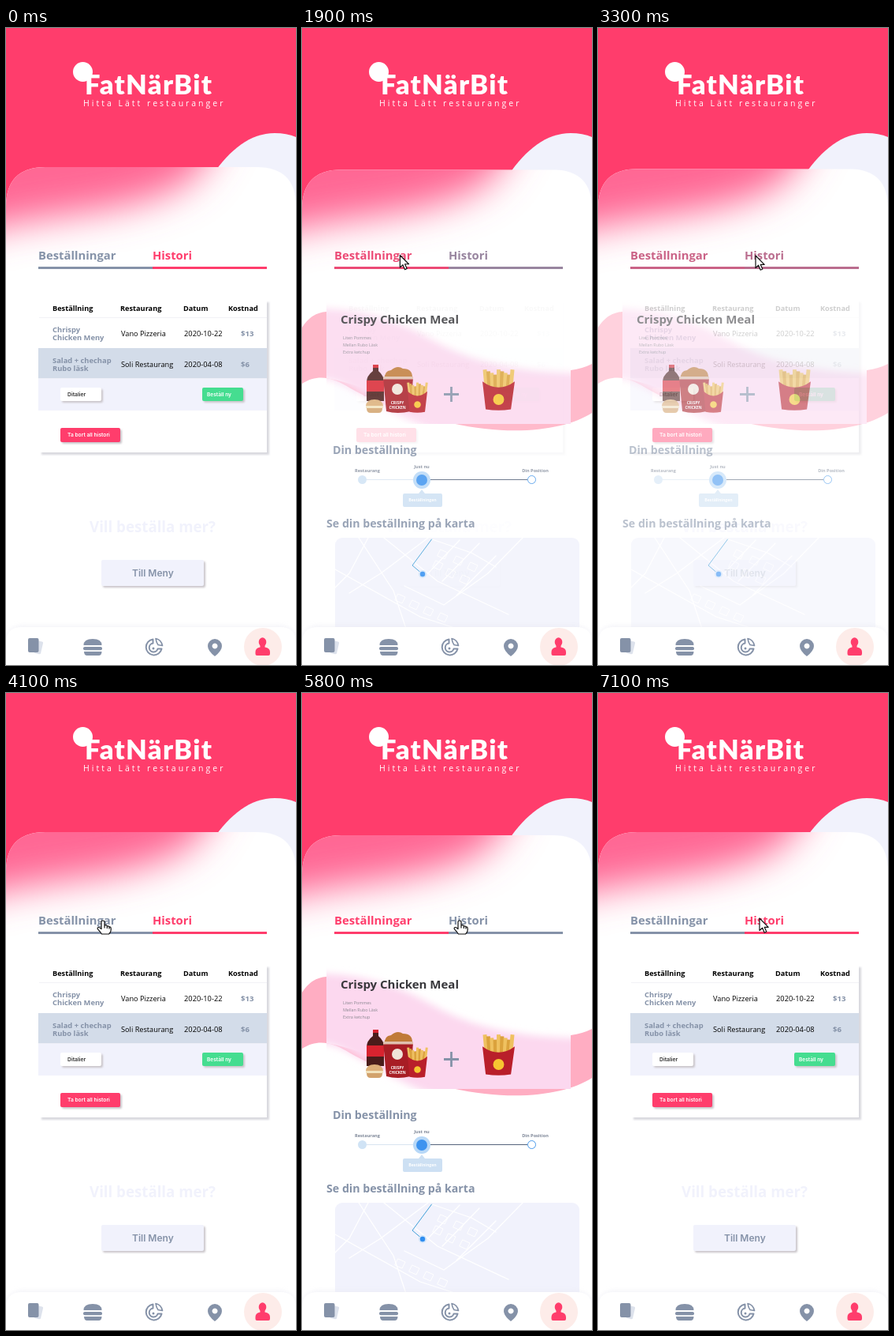
Animation of 368x806 px, one loop 7200 ms. Source, as an HTML page:

```html
<!DOCTYPE html>
<html lang="sv">
<head>
<meta charset="utf-8">
<title>Restaurang</title>
<style>
  html, body { margin: 0; width: 100%; height: 100%; overflow: hidden; background: #fff; }
  svg { display: block; width: 368px; height: 806px; font-family: "Open Sans", "Noto Sans", sans-serif; }
  .b { font-weight: 700; }
  .ui { font-family: Inter, Roboto, sans-serif; font-weight: 600; }
  .gray { fill: #8592a8; }
  .pink { fill: #ff3d6c; }
  .white { fill: #fff; }
  .lav { fill: #f1f2fc; }
  .line { fill: none; stroke-linecap: round; stroke-linejoin: round; }
</style>
</head>
<body>
<svg viewBox="0 0 368 806">
  <defs>
    <filter id="glow" x="-30%" y="-40%" width="160%" height="180%"><feGaussianBlur stdDeviation="24"/></filter>
    <filter id="soft" x="-10%" y="-20%" width="120%" height="140%"><feGaussianBlur stdDeviation="5"/></filter>
    <filter id="shade" x="-10%" y="-30%" width="120%" height="160%"><feGaussianBlur stdDeviation="1"/></filter>
    <filter id="navShade" x="-10%" y="-30%" width="120%" height="160%"><feGaussianBlur stdDeviation="3"/></filter>
    <clipPath id="panelClip"><path d="M0 226Q0 176 50 176H318Q368 176 368 226V806H0Z"/></clipPath>
    <clipPath id="cardClip"><path d="M31 340H341V501H31Z"/></clipPath>
    <clipPath id="mapClip"><rect x="42" y="645" width="310" height="170" rx="9"/></clipPath>
  </defs>

  <rect width="368" height="240" class="pink"/>
  <path class="lav" d="M262 186C284 154 310 133 341 133Q356 133 368 138V250H262Z"/>
  <g class="white">
    <circle cx="97.500" cy="55.500" r="12.500"/>
    <text x="100" y="84" font-family="Lato, sans-serif" font-weight="900" font-size="34.500" letter-spacing="1.300">FatNärBit</text>
    <text x="98" y="99" font-size="10.500" letter-spacing="3.020">Hitta Lätt restauranger</text>
  </g>

  <g id="panel">
    <g clip-path="url(#panelClip)">
      <rect y="170" width="368" height="640" fill="#fff"/>
      <path d="M-100 80H290Q262 180 222 200C185 220 130 230 75 237S-30 256 -100 272Z" fill="#ff6794" filter="url(#glow)"/>
    </g>
  </g>

  <g id="history">
    <path d="M45 347H334V540H45Z" fill="#d9d9df" filter="url(#shade)"/>
    <path d="M42 344H331V537H42Z" class="white"/>
    <path d="M42 366.500H331" stroke="#f2f2f6"/>
    <path d="M41 405H331V443.500H41Z" fill="#d3dce9"/>
    <path d="M41 443.500H331V484H41Z" class="lav"/>
    <g id="rows"></g>
    <g id="buttons"></g>
    <text x="106" y="637.500" class="b lav" font-size="18.700">Vill beställa mer?</text>
  </g>

  <g id="orders">
    <path d="M0 379Q12 360 31 359C100 352 150 368 200 392C250 416 300 440 341 433Q356 431 368 425V487C335 508 270 518 190 500C150 495 100 478 60 455C40 442 20 437 0 450Z" fill="#ffadc2"/>
    <path d="M31 340H341V501H185C130 490 100 455 31 443Z" class="white"/>
    <g clip-path="url(#cardClip)">
      <path d="M10 355C80 354 125 372 168 396C212 421 270 436 360 437V520H200C140 502 100 478 60 455C45 447 30 442 10 444Z" fill="#fcd8ef" filter="url(#soft)"/>
    </g>
    <text x="49" y="374" class="b" font-size="15" fill="#37373b">Crispy Chicken Meal</text>
    <g font-size="5.400" fill="#8a8790">
      <text x="52" y="394">Liten Pommes</text>
      <text x="52" y="403">Mellan Rubo Läsk</text>
      <text x="52" y="412">Extra ketchup</text>
    </g>

    <g id="food">
      <path d="M90 427h7v7q7 6 7 14v24H82v-24q0-8 8-14Z" fill="#4a1c1a"/>
      <path d="M90 426h7v4h-7ZM82 446h22v14H82Z" fill="#d8232f"/>
      <path d="M105 444q-1-10 8-11q8-7 15-2q13 0 12 13Z" fill="#c07a38"/>
      <path d="M103 442H141L138 485Q121 489 107 485Z" fill="#a81d25"/>
      <path d="M103 441H141V444.500H103Z" fill="#e0c0ae"/>
      <circle cx="121" cy="457" r="7" fill="#f0e4d8"/>
      <g class="b white" font-size="4.800" text-anchor="middle">
        <text x="121" y="476">CRISPY</text><text x="121" y="482">CHICKEN</text>
      </g>
      <path d="M81 478q1-8 11-8t11 8Z" fill="#dcae78"/>
      <path d="M81 478h22v3H81Z" fill="#f2e3bd"/>
      <path d="M82 481h20q0 6-5 6H87q-5 0-5-6Z" fill="#d2a26c"/>
    </g>
    <path d="M180 463.500H199M189.500 454V473" stroke="#8592a8" stroke-width="2.800"/>

    <text x="39" y="539" class="b gray" font-size="14.200">Din beställning</text>
    <path d="M76 571.500H152" stroke="#d9e4f1"/>
    <path d="M152 571.500H286" stroke="#56657c"/>
    <circle cx="76.500" cy="571.500" r="5.500" fill="#d0e3f5"/>
    <circle cx="152" cy="572" r="11" fill="#b8d8f7"/>
    <circle cx="152" cy="572" r="7" fill="#3d93ef"/>
    <circle cx="291.500" cy="571.500" r="5" fill="#fff" stroke="#4798ea"/>
    <path d="M148 589L152 584L156 589H176Q178 589 178 591V604Q178 606 176 606H130Q128 606 128 604V591Q128 589 130 589Z" fill="#cde0f3"/>
    <g class="b" font-size="5.600" fill="#7d8697" text-anchor="middle">
      <text x="83" y="562">Restaurang</text>
      <text x="152" y="557">Just nu</text>
      <text x="296" y="562">Din Position</text>
      <text x="153" y="598.500" class="white" font-size="5.200">Beställningen</text>
    </g>

    <text x="31" y="632" class="b gray" font-size="14.200">Se din beställning på karta</text>
    <g clip-path="url(#mapClip)">
      <rect x="42" y="645" width="310" height="170" class="lav"/>
      <g id="streets" class="line" stroke="#fff" stroke-width="1.300"></g>
    </g>
    <path d="M164.500 647L140 680L153 691" class="line" stroke="#3e9fd8"/>
    <circle cx="153" cy="691" r="5" fill="#cfe4fa"/>
    <circle cx="153" cy="691" r="3.200" fill="#2f8df0"/>
  </g>

  <g class="b" font-size="14.800">
    <text x="41" y="293" class="tab">Beställningar</text>
    <text x="186" y="293" class="tab">Histori</text>
    <rect x="41" y="302" width="145" height="3" class="tab"/>
    <rect x="186" y="302" width="145" height="3" class="tab"/>
  </g>

  <g id="nav">
    <rect x="0" y="757" width="368" height="70" rx="20" fill="#e9e9f2" opacity=".7" filter="url(#navShade)"/>
    <path class="white" d="M0 778Q0 758 20 758H348Q368 758 368 778V806H0Z"/>
    <circle cx="326" cy="783" r="24" fill="#fdece9"/>
    <ellipse class="pink" cx="325.500" cy="777" rx="4.800" ry="5.800"/>
    <path class="pink" d="M322.500 780h6v3.500q6.500 1 6.500 6v2.500q0 2-2 2H318.500q-2 0-2-2v-2.500q0-5 6-6Z"/>
    <g class="gray">
      <path d="M39 775l7 1.500q1.500.5 1 2l-3 13q-.5 1-2 .8l-6-1.300Z" fill="#dde2ec"/>
      <rect x="28" y="772" width="13.500" height="18" rx="2"/>
      <path d="M98.500 781q0-8 11.500-8t11.500 8Z"/>
      <rect x="98" y="783" width="24" height="4.200" rx="2"/>
      <path d="M99 789H121.500q0 5-4 5H103q-4 0-4-5Z"/>
      <path fill-rule="evenodd" d="M265 773a9 9 0 0 1 9 9q0 6-9 13q-9-7-9-13a9 9 0 0 1 9-9ZM265 778.500a3.500 3.500 0 1 0 .1 0Z"/>
      <circle cx="187" cy="785" r="1.500"/>
    </g>
    <g class="line" stroke="#8592a8" stroke-width="2">
      <path d="M186.500 773.500A10 10 0 1 0 197.500 785.500H192.500A5.500 5.500 0 1 1 186.500 778.500Z"/>
      <path d="M190 772.500Q197 774 198.500 781.500L193 780.500Q190.500 777 190 772.500Z" stroke-width="1.700"/>
    </g>
  </g>

  <g id="cursor" fill="#fff" stroke="#111" stroke-width="1.200" stroke-linejoin="round">
    <path id="arrow" d="M0 0V15.500L3.600 12.200L6.200 18.200L8.800 17L6.200 11.300H11.200Z"/>
    <path id="hand" d="M-2 1.500Q-2 0 0 0T2 1.500V6Q4.500 5 5.300 7Q7.300 6.300 8 8Q10.200 7.500 10.200 10V12Q10.200 15 7.500 17H-1.500Q-3 14.500-6.500 10.800Q-7.500 9-5.800 8.500Q-4 8.300-2 10.500ZM2 6V9.500M5.300 7V10M8 8V10.500"/>
  </g>
</svg>
<script>
const LOOP = 7200;
const SWITCH_MS = 350;
const CLICKS = [[1740, 1], [3240, 0], [4550, 1], [6440, 0]];
// time, x, y of the pointer tip
const PATH = [
  [400, 372, 560], [1100, 140, 316], [1400, 126, 288], [2350, 123, 287],
  [2900, 200, 288], [3850, 200, 288], [4100, 123, 288], [4300, 105, 286],
  [5350, 105, 286], [5800, 200, 288], [6100, 205, 285]
];
const $ = id => document.getElementById(id);
const tabs = document.querySelectorAll('.tab');

const text = (x, y, s, cls, size) => `<text x="${x}" y="${y}" class="${cls}" font-size="${size}">${s}</text>`;

$('rows').innerHTML =
  [[59, 'Beställning'], [145, 'Restaurang'], [225, 'Datum'], [282, 'Kostnad']]
    .map(([x, s]) => text(x, 358, s, 'b', 9.2)).join('') +
  [
    [390, 'Chrispy', 'Chicken Meny', 'Vano Pizzeria', '2020-10-22', '$13'],
    [429, 'Salad + chechap', 'Rubo läsk', 'Soli Restaurang', '2020-04-08', '$6']
  ].map(([y, a, b, place, date, cost]) =>
    text(59, y - 5, a, 'b gray', 9.4) + text(59, y + 5, b, 'b gray', 9.4) +
    text(146, y, place, '', 9.2) + text(226, y, date, '', 9.3) +
    text(298, y, cost, 'b gray', 9.6)).join('');

const button = (x, y, w, h, fill, label, tx, size, color) => `
  <rect x="${x + 2}" y="${y + 2}" width="${w}" height="${h}" rx="2" fill="#c9c5c9" filter="url(#shade)"/>
  <rect x="${x}" y="${y}" width="${w}" height="${h}" rx="2" fill="${fill}"/>
  <text x="${tx}" y="${y + h / 2 + size * .36}" class="ui" font-size="${size}" style="fill:${color}">${label}</text>`;

$('buttons').innerHTML =
  button(69, 455, 52, 17, '#fff', 'Ditalier', 78, 6.8, '#333') +
  button(249, 455, 52, 17, '#45dd90', 'Beställ ny', 255, 6.6, '#fff') +
  button(69, 506, 76, 18, '#ff3d6c', 'Ta bort all histori', 78, 6.7, '#fff') +
  button(121, 673, 130, 33, '#f1f2fc', 'Till Meny', 160, 12, '#8592a8');

// A box of fries: sticks fanned over a red carton.
const fries = (x, y, w, h) => {
  let s = '';
  for (let i = 0; i < 9; i++) {
    const px = x + w * (.14 + i * .09), lift = h * (.04 + .12 * (i * 5 % 4) / 3);
    s += `<path d="M${px} ${y + h * .6}L${px + (i - 4) * .7} ${y + lift}" stroke="${i % 2 ? '#dba23c' : '#efc160'}" stroke-width="${w * .12}"/>`;
  }
  return s + `<path d="M${x} ${y + h * .32}Q${x + w / 2} ${y + h * .6} ${x + w} ${y + h * .32}L${x + w * .88} ${y + h * .97}Q${x + w / 2} ${y + h * 1.02} ${x + w * .1} ${y + h * .97}Z" fill="#b91f2a"/>
    <circle cx="${x + w / 2}" cy="${y + h * .74}" r="${w * .17}" fill="#f7c531"/>`;
};
$('food').innerHTML += fries(134, 447, 25, 40) + fries(229, 430, 41, 54);

const roads = ['M42 685L150 745L290 790', 'M72 645L116 712L132 760', 'M60 715L100 690L160 645',
  'M130 706L180 730L236 690L280 645', 'M165 647L215 664L246 682', 'M104 645L172 700L262 742',
  'M160 690L200 648M178 700L225 652M196 718L246 668', 'M84 645L60 690L42 708'];
const blocks = [[122, 716], [140, 724], [158, 732], [176, 740], [176, 660], [196, 668], [214, 676], [186, 684], [204, 692], [170, 674]];
$('streets').innerHTML = `<path d="${roads.join('')}"/>` +
  blocks.map(([x, y]) => `<path d="M${x} ${y}l9 4l-4 8l-9-4Z" stroke-width="1"/>`).join('');

const clamp = v => Math.min(1, Math.max(0, v));
const easeOut = p => 1 - (1 - p) ** 3;
const easeInOut = p => p * p * (3 - 2 * p);

function ordersShown(t) {
  let v = 0, active = 0;
  for (const [start, to] of CLICKS) {
    if (t < start) break;
    v += (to - v) * easeOut(clamp((t - start) / SWITCH_MS));
    active = to;
  }
  return [v, active];
}

function pointer(t) {
  const i = PATH.findIndex(k => k[0] > t);
  if (i < 0) return PATH.at(-1).slice(1);
  if (!i) return null;
  const [t0, x0, y0] = PATH[i - 1], [t1, x1, y1] = PATH[i];
  const p = easeInOut((t - t0) / (t1 - t0));
  return [x0 + (x1 - x0) * p, y0 + (y1 - y0) * p];
}

function draw(t) {
  const [v, active] = ordersShown(t);
  $('history').style.opacity = 1 - v;
  $('orders').style.opacity = v;
  $('panel').setAttribute('transform', `translate(0 ${4 * v})`);
  tabs.forEach((el, i) => {
    const on = i % 2 ? 1 - v : v;
    el.style.fill = `color-mix(in srgb, #ff3d6c ${on * 100}%, #8592a8)`;
  });

  const pos = pointer(t);
  $('cursor').style.display = pos ? '' : 'none';
  if (!pos) return;
  const [x, y] = pos;
  const overOrders = x < 186;
  const hand = y > 275 && y < 305 && overOrders !== !!active;
  $('cursor').setAttribute('transform', `translate(${x} ${y})`);
  $('hand').style.display = hand ? '' : 'none';
  $('arrow').style.display = hand ? 'none' : '';
}

const begin = performance.now();
function tick() {
  draw((performance.now() - begin) % LOOP);
  requestAnimationFrame(tick);
}
draw(0);
requestAnimationFrame(tick);
</script>
</body>
</html>
```
